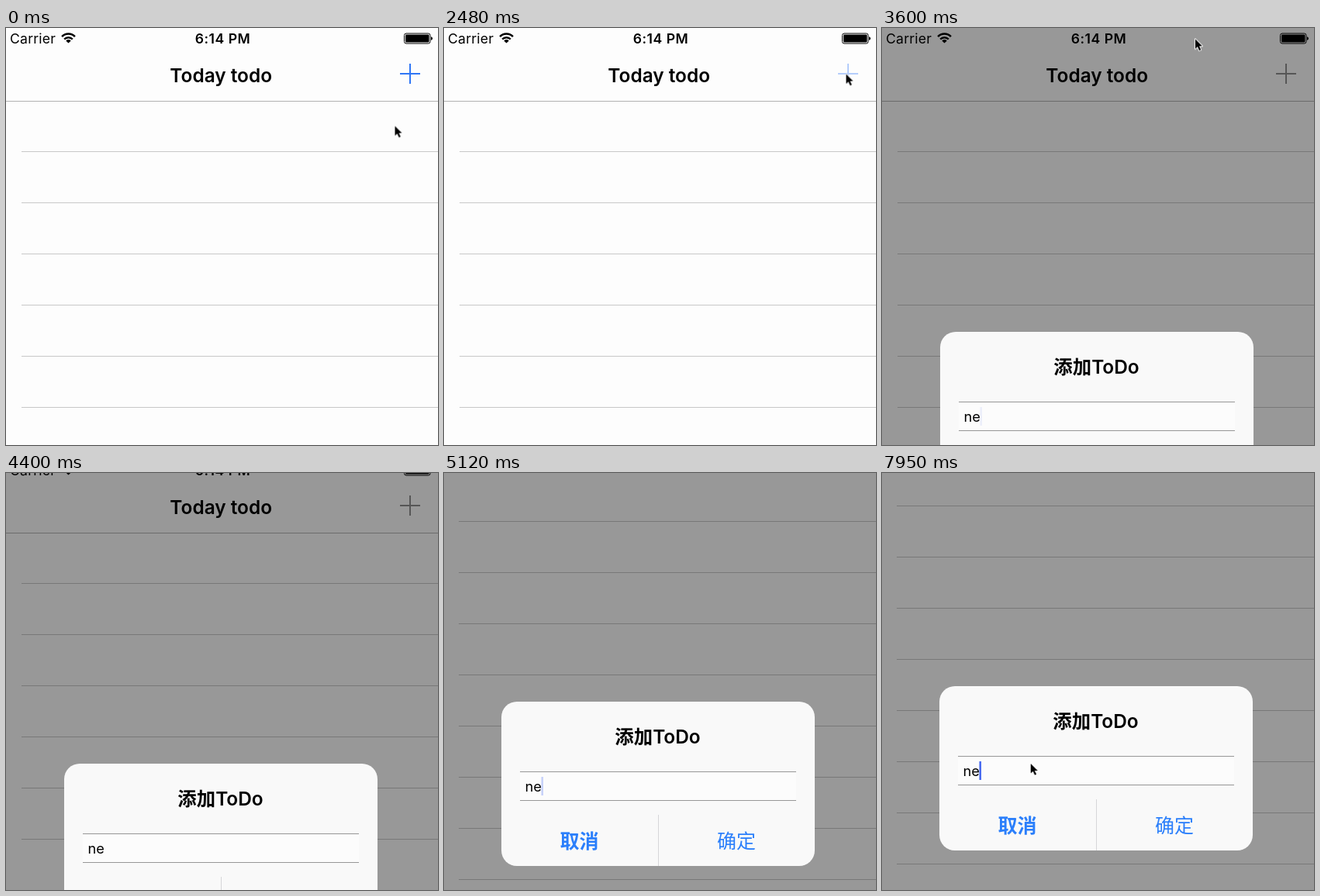
An HTML page that plays this animation: 557 by 538 pixels, repeating every 8000 ms.

```html
<!DOCTYPE html>
<html lang="en">
<head>
<meta charset="utf-8">
<title>Today todo</title>
<style>
  html, body { margin: 0; width: 100%; height: 100%; overflow: hidden; background: #fdfdfd; }
  svg { display: block; width: 557px; height: 538px; font-family: Inter, "Noto Sans CJK SC", "Noto Sans CJK", sans-serif; }
  g, rect, path { animation: 8s linear infinite; }
  .mid { text-anchor: middle; }
  .bold { font-weight: 600; }
  .title { font-size: 24.4px; }
  .status { font-size: 17.6px; letter-spacing: .2px; }
  .action { font-size: 25px; fill: #2b7ffb; }

  #window { animation-name: drag, nudge; animation-timing-function: linear, step-end; }
  #plus { stroke: #2f76f5; animation-name: press; }
  #dim { opacity: 0; animation-name: dim; }
  #alert { transform-origin: 277px 498px; animation-name: pop; }
  #sides { animation-name: settle; }
  #underline { animation-name: draw; }
  #caret { animation-name: blink; }
  #pointer { animation-name: point; }

  /* 1% is 80 ms */
  @keyframes drag {
    0%, 51% { transform: translateY(0); animation-timing-function: steps(17); }
    55% { transform: translateY(-17px); animation-timing-function: steps(55); }
    61% { transform: translateY(-72px); animation-timing-function: steps(25); }
    64% { transform: translateY(-97px); animation-timing-function: steps(20); }
    66.75%, 100% { transform: translateY(-117px); }
  }
  @keyframes nudge {
    0% { translate: 0px; }
    58%, 100% { translate: -1px; }
  }
  @keyframes press {
    0%, 29.4% { stroke: #2f76f5; }
    29.5%, 31.75% { stroke: #b4cdfb; }
    33.125% { stroke: #8c91a0; }
    36%, 100% { stroke: #8f8f8f; }
  }
  @keyframes dim {
    0%, 31.75% { opacity: 0; }
    33.125% { opacity: .35; }
    35%, 100% { opacity: .4; }
  }
  @keyframes pop {
    0%, 31.75% { opacity: 0; transform: scale(1.2); }
    33.125% { opacity: .87; transform: scale(1.025); }
    35%, 100% { opacity: 1; transform: none; }
  }
  @keyframes settle {
    0%, 33.2% { opacity: 1; }
    35%, 100% { opacity: 0; }
  }
  @keyframes draw {
    0%, 33.2% { opacity: 0; }
    35%, 100% { opacity: 1; }
  }
  @keyframes blink {
    0%, 39.375%, 46.375%, 51.375%, 58.375%, 63.375%, 70.375%, 75.375%, 82.375%, 87.375%, 94.375%, 100% { opacity: 1; }
    40%, 52%, 64%, 76%, 88% { opacity: .3; }
    41.125%, 44.875%, 53.125%, 56.875%, 65.125%, 68.875%, 77.125%, 80.875%, 89.125%, 92.875% { opacity: 0; }
  }
  @keyframes point {
    0%, .62% { transform: translate(501.5px, 126.5px); }
    .625%, 8.1% { transform: translate(500.5px, 126.5px); }
    11% { transform: translate(482px, 174px); }
    14% { transform: translate(500px, 146px); }
    16.5% { transform: translate(517px, 92px); }
    17.75%, 19.1% { transform: translate(519.5px, 61px); }
    19.125%, 35% { transform: translate(518.5px, 59.5px); }
    39.1% { transform: translate(458px, 45px); }
    43% { transform: translate(420px, 22px); }
    48% { transform: translate(380px, 3px); }
    49.5% { transform: translate(372px, -20px); }
    93.59% { transform: translate(385px, -20px); }
    93.6% { transform: translate(385px, 17px); }
    96.5% { transform: translate(234px, 277px); }
    99.1%, 100% { transform: translate(191.7px, 375px); }
  }
</style>
</head>
<body>
<svg viewBox="0 0 557 538">
  <g id="window">
    <rect width="560" height="700" fill="#fdfdfd"/>

    <text class="status" x="5" y="20">Carrier</text>
    <path d="M72.1 11.2A11.5 11.5 0 0 1 88.9 11.2M75.2 14.5A7.3 7.3 0 0 1 85.8 14.5" fill="none" stroke="#000" stroke-width="2.5"/>
    <path d="M80.5 19.5L77.3 16.4A4.4 4.4 0 0 1 83.7 16.4Z"/>
    <text class="status bold mid" x="279.5" y="20" style="letter-spacing:.5px">6:14 PM</text>
    <rect x="513.5" y="7" width="33.5" height="13" rx="2.5" fill="none" stroke="#000"/>
    <rect x="515" y="8.5" width="30.5" height="10" rx="1"/>
    <path d="M548 11.2q2 .4 2 2.3t-2 2.3z"/>

    <text class="title bold mid" x="277.2" y="70">Today todo</text>
    <path id="plus" d="M508 59H534M521 46V72" stroke-width="2"/>
    <path d="M0 94.5H560" stroke="#b2b2b2"/>
    <path d="M20 159.5H560M20 225.5H560M20 291.5H560M20 357.5H560M20 423.5H560M20 489.5H560M20 555.5H560M20 621.5H560M20 687.5H560" stroke="#c8c8c8"/>

    <rect id="dim" width="560" height="700"/>

    <g id="alert">
      <rect x="75" y="392" width="404" height="212" rx="20" fill="#f9f9f9"/>
      <text class="title bold mid" x="276.5" y="446">添加ToDo</text>
      <rect x="99" y="482" width="356" height="38" fill="#fff" opacity=".4"/>
      <path d="M99 482.5H455" stroke="#969696"/>
      <path id="underline" d="M99 519.5H455" stroke="#969696"/>
      <path id="sides" d="M99.5 482V520M454.5 482V520" stroke="#969696"/>
      <text x="105.5" y="508" font-size="18.2">ne</text>
      <rect id="caret" x="126.4" y="489" width="2.6" height="24" fill="#4a6cf0"/>
      <path d="M277.5 538V604" stroke="#d6d6d8"/>
      <text class="action bold mid" x="175.5" y="581">取消</text>
      <text class="action mid" x="378" y="581">确定</text>
    </g>
  </g>

  <g id="pointer">
    <path d="M0 0V12.6L2.9 9.8L5.2 14.8L7.3 13.8L5.1 9H9Z" stroke="#fff" stroke-width="1.8" stroke-linejoin="round" paint-order="stroke"/>
  </g>
</svg>
</body>
</html>
```
